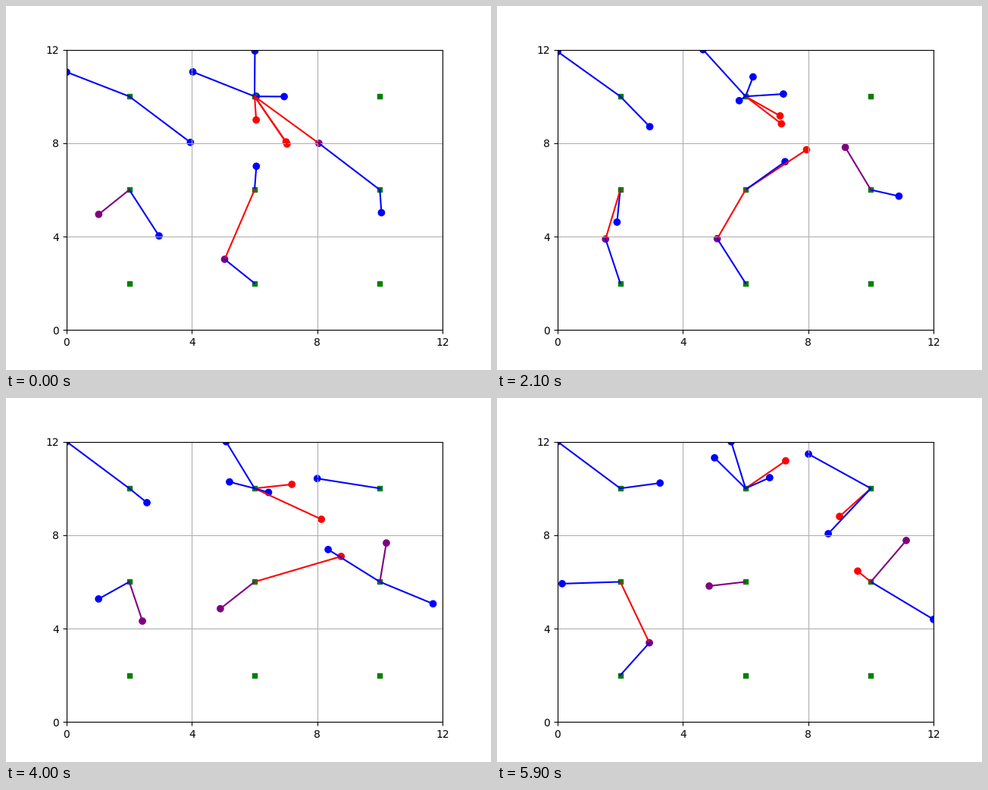
A matplotlib script that plays this animation: 640x480 px, repeating every 6 s.

```python
from itertools import product

import matplotlib.pyplot as plt
import numpy as np
from matplotlib.animation import FuncAnimation

FRAMES, STEP_MS = 60, 100
SIZE = 12
HOLD = 4  # steps a better downlink cell must last before handover

STATIONS = np.array(list(product([2, 6, 10], repeat=2)), float)
STATION_X, STATION_Y = STATIONS.T

# Downlink reach: strongest in the middle column, weak in the bottom row
REACH = np.where(STATION_Y == 2, 0.7,
                 np.interp(STATION_X, [2, 6, 10], [1.3, 1.7, 1.05]))
REACH += 1e-4 * STATION_Y  # break ties upwards

# Each user starts on a whole grid point and walks its turns at a steady pace
ROUTES = {
    "red": [
        [(6, 9), (8.85, 8.57), (9, 8.8)],
        [(7, 8), (7.28, 11.18)],
        [(7, 8), (7.05, 7.95), (7.36, 8.17), (9.58, 6.46)],
    ],
    "blue": [
        [(0, 11), (0, 13.5)],
        [(4, 8), (2.33, 9.11), (3.27, 10.23)],
        [(4, 11), (4.6, 12), (5.54, 14.1)],
        [(6, 12), (6.46, 9.76), (6.87, 9.98), (6.77, 10.46)],
        [(6, 10), (8, 10.17), (8.01, 11.47)],
        [(7, 10), (5.3, 9.74), (5.01, 11.31)],
        [(10, 5), (10.35, 5.15), (10.87, 5.75), (12.5, 4.39)],
        [(6, 7), (8.82, 7.46), (8.64, 8.06)],
        [(3, 4), (1.89, 4.62), (0.145, 5.92)],
    ],
    "purple": [
        [(8, 8), (10.95, 7.55), (11.13, 7.77)],
        [(5, 3), (5.34, 3.2), (4.85, 4.62), (4.97, 5.1), (4.84, 5.82)],
        [(1, 5), (1.56, 3.83), (2.42, 4.32), (2.93, 3.39)],
    ],
}


def walk(route):
    """Start point, then one position per frame, evenly spaced along the route."""
    x, y = np.array(route, float).T
    length = np.append(0, np.cumsum(np.hypot(np.diff(x), np.diff(y))))
    at = np.linspace(0, length[-1], FRAMES + 1)
    path = np.column_stack([np.interp(at, length, x), np.interp(at, length, y)])
    return np.clip(path, 0, SIZE)


def best_cells(path, reach):
    distance = np.linalg.norm(path[:, None] - STATIONS, axis=2)
    return np.argmin(distance / reach, axis=1)


def with_handover(best):
    """Keep the serving cell until another has been better for HOLD steps."""
    cell, wait, served = best[0], 0, []
    for candidate in best:
        wait = wait + 1 if candidate != cell else 0
        if wait >= HOLD:
            cell, wait = candidate, 0
        served.append(cell)
    return served


class User:
    def __init__(self, route, color):
        path = walk(route)
        self.color = color
        self.path = path[1:]
        self.up = best_cells(path, 1)[1:]
        self.down = with_handover(best_cells(path, REACH))[1:]

    def links(self, k):
        up, down = self.up[k], self.down[k]
        if self.color == "red":
            return [(down, "red")]
        if self.color == "blue":
            return [(up, "blue")]
        if up == down:
            return [(up, "purple")]
        return [(down, "red"), (up, "blue")]


users = [User(route, color) for color, routes in ROUTES.items() for route in routes]

fig, ax = plt.subplots(figsize=(6.4, 4.8), dpi=100)
ticks = range(0, SIZE + 1, 4)
ax.set(xlim=(0, SIZE), ylim=(0, SIZE), xticks=ticks, yticks=ticks)
ax.grid(True)

dots = ax.scatter(*np.transpose([u.path[0] for u in users]),
                  c=[u.color for u in users])
ax.scatter(STATION_X, STATION_Y, s=20, c="green", marker="s")
lines = [ax.plot([], [])[0] for _ in range(len(users) + len(ROUTES["purple"]))]


def draw(k):
    dots.set_offsets([u.path[k] for u in users])
    links = [(u.path[k], cell, color) for u in users for cell, color in u.links(k)]
    for line in lines:
        line.set_data([], [])
    for line, (pos, cell, color) in zip(lines, links):
        line.set_data(*zip(STATIONS[cell], pos))
        line.set_color(color)
    return [dots, *lines]


anim = FuncAnimation(fig, draw, frames=FRAMES, interval=STEP_MS,
                     repeat=True, repeat_delay=0)
plt.show()
```
